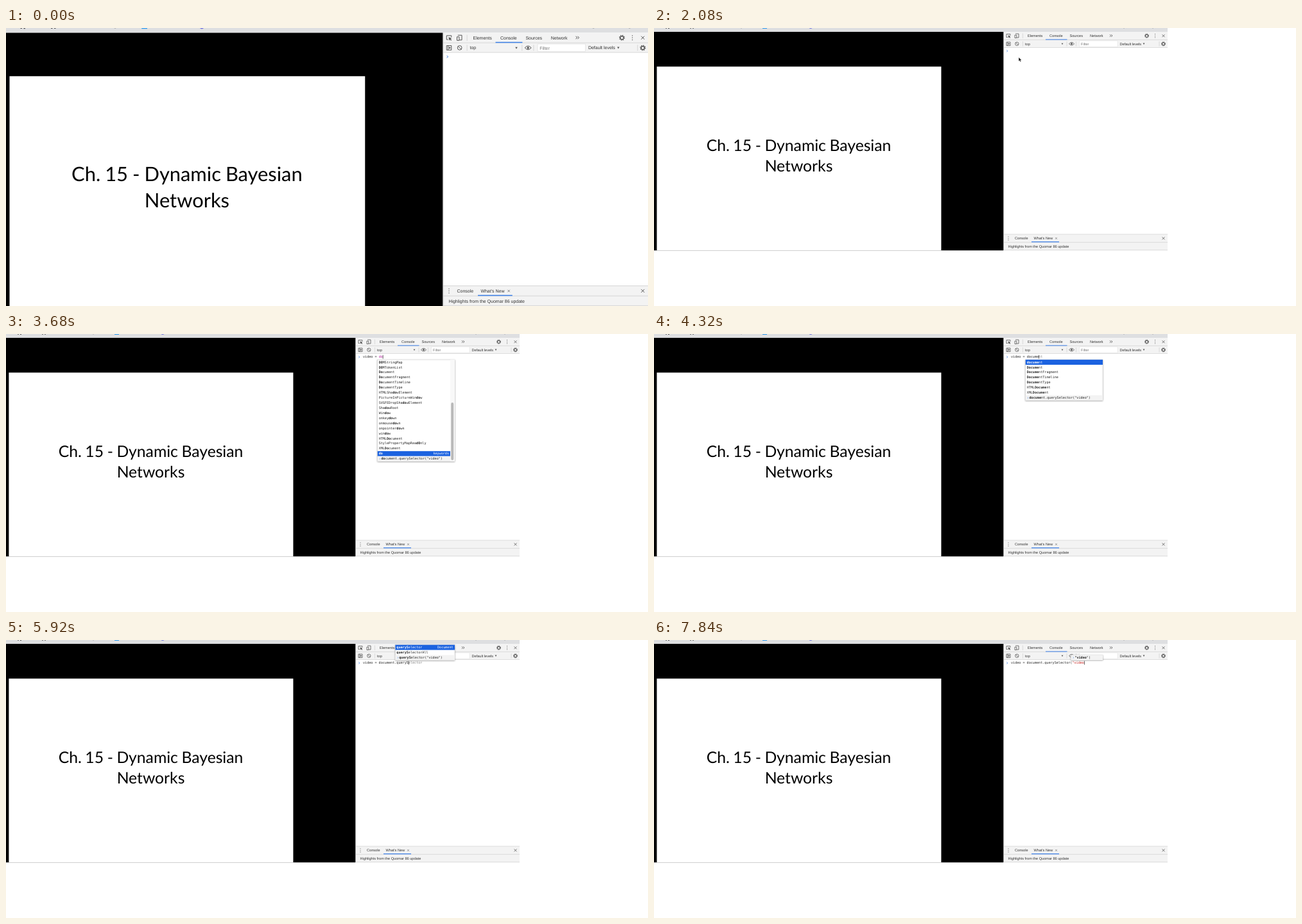
An HTML page that plays this animation: 1000 px wide and 434 px high, repeating every 8 s.

```html
<!DOCTYPE html>
<html lang="en">
<head>
<meta charset="utf-8">
<title>Console autocomplete</title>
<style>
html, body { margin: 0; width: 100%; height: 100%; overflow: hidden; background: #fff; }
svg { display: block; width: 1000px; height: 434px; }
text { white-space: pre; text-rendering: geometricPrecision; fill: #333; font: 5.6px "Liberation Sans", Arial, sans-serif; }
.title text { font: 24.7px Lato, Carlito, sans-serif; word-spacing: -.7px; text-anchor: middle; fill: #000; }
.mono text { font: 5.12px "DejaVu Sans Mono", Menlo, monospace; fill: #222; }
.icon { fill: none; stroke: #555; stroke-width: .8; }
.sep { stroke: #ccc; stroke-width: .6; }
.mono .white { fill: #fff; }
.mono .gray { fill: #888; }
.mono .keyword { fill: #b5179e; }
.mono .string { fill: #c41a16; }
.bold { font-weight: bold; }
</style>
</head>
<body>
<svg viewBox="0 0 1000 434">
<defs>
  <filter id="shadow" x="-10%" y="-10%" width="120%" height="130%">
    <feDropShadow dx="0" dy=".8" stdDeviation=".8" flood-opacity=".4"/>
  </filter>
  <g id="gear" class="icon">
    <circle r="2.1" stroke-width="1.2"/>
    <circle r="3.1" stroke-width="1" stroke-dasharray="1.2 1.235"/>
  </g>
  <path id="cross" class="icon" d="M-2-2 2 2M-2 2 2-2"/>
  <path id="dots" d="M0-2.6v.01M0 0v.01M0 2.6v.01" stroke="#555" stroke-width="1.1" stroke-linecap="round"/>
  <path id="down" d="M-1.4-1.1h2.8L0 1.3z" fill="#555"/>
</defs>
<g id="scene">
  <!-- browser strip -->
  <path fill="#dedfe1" d="M0 0h800v6H0z"/>
  <path fill="#555" d="M18 0h2v.8h-2zM22 0h2v1h-2zM56 0h2v.8h-2zM60 0h2v.8h-2z"/>
  <path fill="#2b9bf0" d="M169 0h7v1h-7z"/>
  <path fill="#6c6fe0" d="M241.500 0h5q-2.500 2.200-5 0z"/>
  <path fill="#aaa" d="M135 0h2v.5h-2zM731 0h2v.6h-2zM776 0h2v.5h-2z"/>
  <!-- slide -->
  <path d="M0 6h544v341.200H0z"/>
  <path fill="#fff" d="M4.400 60.200H447.400V347.200H4.400z"/>
  <g class="title">
    <text x="225.500" y="191.500">Ch. 15 - Dynamic Bayesian</text>
    <text x="225.500" y="223.700">Networks</text>
  </g>
  <!-- developer tools -->
  <path fill="#fff" d="M545 6h255v341H545z"/>
  <path fill="#f3f3f3" d="M545 6h255v24.500H545zM545 322h255v25.200H545z"/>
  <path class="sep" d="M545 18.500h255M545 30.500h255M545 322h255M545 334.600h255M545 346.700h255"/>
  <path class="sep" d="M574.500 8.500v7.500M574.500 21v7.500M643 21v7.500M657.500 21v7.500M787 21v7.500"/>
  <path stroke="#a3a3a3" d="M544.500 6v341.200"/>
  <path fill="#3b7fe8" d="M610 17.400h33.500v1.200H610zM588 333.300h43v1.200h-43z"/>

  <path class="icon" d="M551 14.500h-2V9.500h6v2"/>
  <path fill="#555" d="M551.500 11.300l4 1.500-1.600.8 1.400 1.400-.8.700-1.300-1.400-.9 1.400z"/>
  <path class="icon" d="M563 9h5v6h-3M562 11h2.700v4.500H562z"/>
  <text x="582" y="14.200">Elements</text>
  <text x="616" y="14.200">Console</text>
  <text x="647.500" y="14.200">Sources</text>
  <text x="679" y="14.200">Network</text>
  <path class="icon" d="M710 10.200l1.700 1.800-1.700 1.800M712.300 10.200l1.700 1.800-1.700 1.800"/>
  <use href="#gear" x="767.500" y="12.200"/>
  <use href="#dots" x="780.500" y="12.200"/>
  <use href="#cross" x="793.500" y="12.200"/>

  <path class="icon" d="M549 22h6v5.500h-6zM550.800 22v5.500"/>
  <path fill="#555" d="M552 23l2.300 1.700-2.300 1.700z"/>
  <path class="icon" d="M563.300 22.700l4 4"/>
  <circle class="icon" cx="565.300" cy="24.700" r="2.700"/>
  <text x="578" y="26.600">top</text>
  <use href="#down" x="636" y="24.800"/>
  <path class="icon" d="M646.500 24.700q4-4.600 8 0q-4 4.600-8 0z"/>
  <circle cx="650.500" cy="24.700" r="1.400" fill="#555"/>
  <path fill="#fff" stroke="#ddd" stroke-width=".5" d="M662.500 20h59.500v9.300h-59.500z"/>
  <text x="665" y="26.900" style="fill:#777">Filter</text>
  <text x="725.500" y="26.500">Default levels</text>
  <use href="#down" x="763" y="24.600"/>
  <use href="#gear" x="793.500" y="24.800"/>

  <path class="icon" style="stroke:#3b7be0" d="M549.300 34.400l1.500 1.500-1.500 1.500"/>

  <use href="#dots" x="552" y="328.300"/>
  <text x="562" y="330.300">Console</text>
  <text x="591.500" y="330.300">What's New</text>
  <use href="#cross" transform="translate(626.500 328.400) scale(.7)"/>
  <use href="#cross" x="793.500" y="328.300"/>
  <text x="551.500" y="343">Highlights from the Quomar 86 update</text>

  <g id="live" class="mono"></g>
  <path id="mouse" d="M0 0v6.300l1.500-1.300 1 2.300 1.200-.5-1-2.300h2z" stroke="#fff" stroke-width=".5"/>
</g>
</svg>
<script>
const STEP = 160, LOOP = 8000, CHAR = 3.08, LEFT = 556, ROW = 7.93, MAX_ROWS = 20;
const line = 'video = document.querySelector("video")';
const FOCUS = 14;
// characters typed at each step after the prompt takes focus
const typed = [0, 1, 2, 3, 4, 5, 6, 8, 9, 10, 11, 12, 13, 14, 16, 17, 19, 20, 21, 22, 22, 22,
  23, 23, 24, 25, 26, 27, 28, 30, 31, 32, 33, 34, 35, 37];

const globals = ('document video valueOf var void visualViewport HTMLVideoElement VideoPlaybackQuality ' +
  'DOMStringMap DOMTokenList Document DocumentFragment DocumentTimeline DocumentType HTMLShadowElement ' +
  'PictureInPictureWindow SVGFEDropShadowElement ShadowRoot Window onkeydown onmousedown onpointerdown ' +
  'window HTMLDocument StylePropertyMapReadOnly XMLDocument do').split(' ');
const members = ('URL activeElement adoptNode alinkColor anchors append applets bgColor body captureEvents ' +
  'characterSet charset childElementCount children clear close compatMode contentType cookie createAttribute ' +
  'queryCommandEnabled queryCommandIndeterm queryCommandState queryCommandSupported queryCommandValue ' +
  'querySelector querySelectorAll isEqualNode').split(' ');
const labels = { do: 'keywords', isEqualNode: 'Node' };

const $ = id => document.getElementById(id);
const rect = (x, y, w, h, fill, more = '') =>
  `<rect x="${x}" y="${y}" width="${w}" height="${h}" fill="${fill}" ${more}/>`;
const text = (x, y, s, cls = '', more = '') => `<text x="${x}" y="${y}" class="${cls}" ${more}>${s}</text>`;

function emphasize(s, query) {
  const i = s.toLowerCase().indexOf(query.toLowerCase()), end = i + query.length;
  if (!query || i < 0) return s;
  return `${s.slice(0, i)}<tspan class="bold">${s.slice(i, end)}</tspan>${s.slice(end)}`;
}

function popup(start, query, names, chosen, isMember) {
  const all = [...names, line.slice(start)];
  const scrolls = all.length > MAX_ROWS;
  const first = scrolls ? Math.min(Math.max(chosen, 0), all.length - MAX_ROWS) : 0;
  const rows = all.slice(first, first + MAX_ROWS);
  const x = LEFT + start * CHAR, left = x - 1.9, height = rows.length * ROW;
  const right = !isMember || rows.length < 4 ? 699 : scrolls ? 748 : 711;
  const top = rows.length < 4 ? 31.4 - height : 40.1;
  let out = rect(left, top, right - left, height, '#fff', 'stroke="#bbb" stroke-width=".4" filter="url(#shadow)"');
  rows.forEach((name, i) => {
    const index = first + i, y = top + i * ROW, base = y + 5.5;
    const past = index === all.length - 1, on = index === chosen;
    const label = past ? '' : isMember && index === 0 ? 'Document' : labels[name];
    if (on || past) out += rect(left, y, right - left, ROW, on ? '#1b62e0' : '#f3f3f3');
    if (past) out += `<path class="icon" style="stroke:#3b7be0;stroke-width:.5" d="M${x + 1.2} ${y + 3}l1.200 1.100-1.200 1.100"/>`;
    out += text(past ? x + 3.9 : x, base, emphasize(name, query), on ? 'white' : '');
    if (label) out += text(right - (scrolls ? 9 : 2.4), base, label, on ? 'white' : 'gray', 'text-anchor="end"');
  });
  if (scrolls) {
    out += rect(right - 7, top, 7, height, '#f8f8f8');
    out += rect(right - 5.8, first ? top + 67 : top + 1, 4, 90, '#b9b9b9', 'rx="2"');
  }
  return out;
}

function consoleView(n) {
  const done = line.slice(0, n), query = done.match(/["\w]*$/)[0];
  const start = n - query.length, caret = LEFT + n * CHAR;
  const isMember = done[start - 1] === '.';
  const pool = isMember ? members : query ? globals : [];
  const names = pool.filter(s => s.toLowerCase().includes(query.toLowerCase()));
  const chosen = names.includes(query) ? names.indexOf(query) : names.findIndex(s => s.startsWith(query));
  const kind = query === 'do' ? 'keyword' : query[0] === '"' ? 'string' : '';
  let out = text(LEFT, 37.3, done.slice(0, start)) + text(LEFT + start * CHAR, 37.3, query, kind);
  if (chosen >= 0) out += text(caret, 37.3, names[chosen].slice(query.length), 'gray');
  out += rect(caret, 32.8, 0.6, 5.8, '#000');
  return n ? out + popup(start, query, names, chosen, isMember) : out;
}

function show(step) {
  $('scene').setAttribute('transform', step ? 'scale(1)' : 'scale(1.25)');
  $('live').innerHTML = step < FOCUS ? '' : consoleView(typed[step - FOCUS]);
  const p = Math.min(Math.max((step - 1) / 11, 0), 1), ease = p * p * (3 - 2 * p);
  $('mouse').setAttribute('transform', `translate(${586 - 18 * ease} ${111.7 - 66 * ease})`);
  $('mouse').setAttribute('visibility', step && step <= FOCUS ? 'visible' : 'hidden');
}

let shown = -1;
function frame() {
  const step = Math.floor(performance.now() % LOOP / STEP);
  if (step !== shown) show(shown = step);
  requestAnimationFrame(frame);
}
frame();
</script>
</body>
</html>
```
